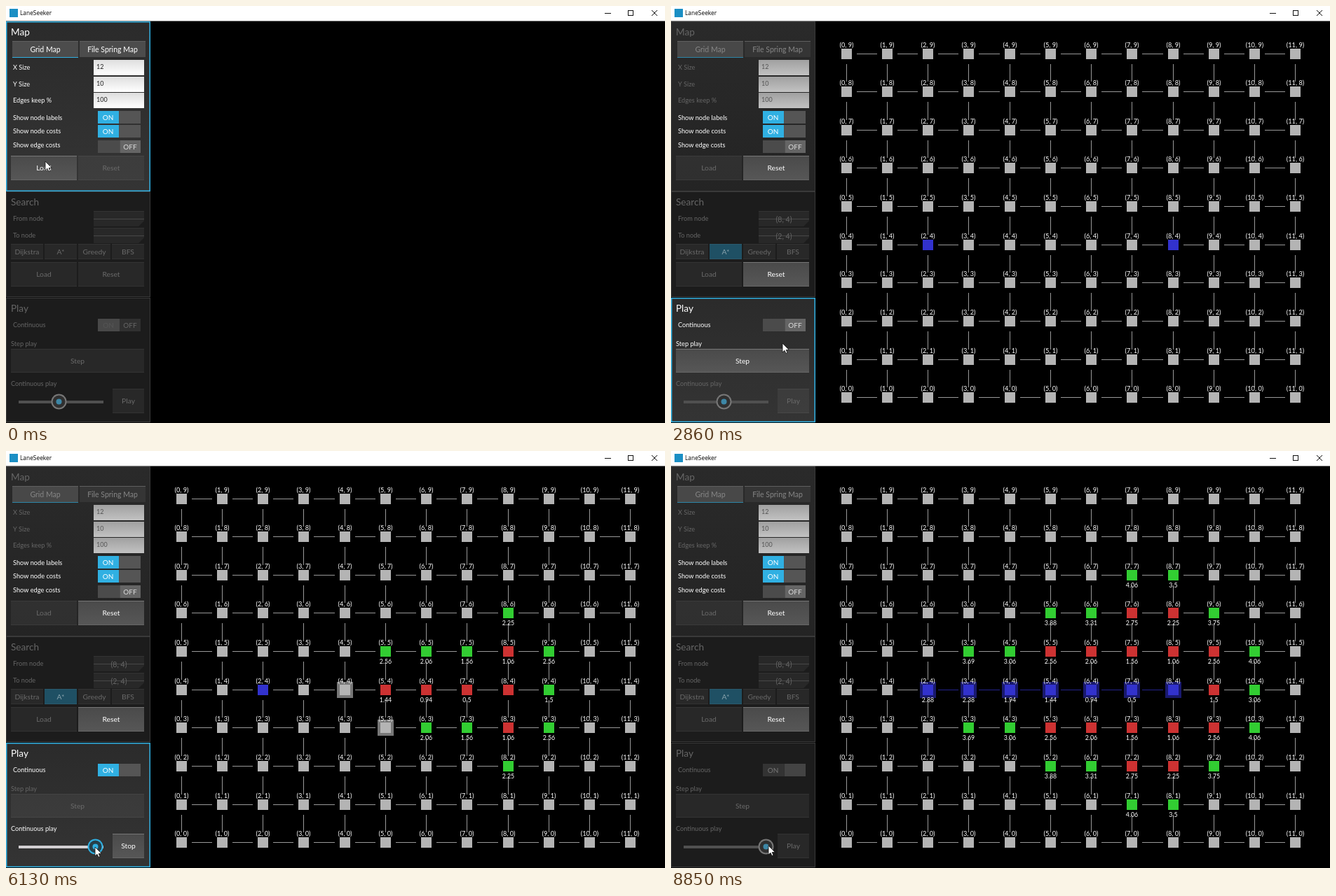
An HTML page with a canvas that plays this animation: 940 by 596 pixels, repeating every 9250 ms.

```html
<!DOCTYPE html>
<html lang="en">
<head>
<meta charset="utf-8">
<title>Grid search</title>
<style>
html, body { margin: 0; width: 100%; height: 100%; overflow: hidden; background: #000; }
canvas { display: block; }
</style>
</head>
<body>
<canvas id="stage" width="940" height="596"></canvas>
<script>
const c = document.getElementById('stage').getContext('2d');
const LOOP = 9250, BLUE = '#30b0e2', COLS = 12, ROWS = 10;
const FROM = [8, 4], TO = [2, 4];

// Moments of the clicks, and of the first search step
const LOADED = 320, CHOSEN = 1520, READY = 2450, CONTINUOUS = 3470, PLAY = 4240, DRAG = 4900, SEARCH = 4390;

// Time, x, y of the pointer tip
const pointerPath = [[790, 56, 222], [1100, 92, 285], [1360, 75, 353], [2080, 74, 352],
  [2350, 54, 384], [2520, 54, 384], [2855, 159, 482], [3160, 177, 457], [3550, 177, 457],
  [4080, 159, 569], [4320, 159, 569], [DRAG, 75, 566], [6300, 134, 566], [6500, 139, 564]];

function pointerAt(t) {
  const k = pointerPath.findIndex(p => p[0] > t);
  if (k <= 0) return pointerPath.at(k).slice(1);
  const p = pointerPath[k - 1], q = pointerPath[k];
  const u = (t - p[0]) / (q[0] - p[0]);
  return [1, 2].map(i => Math.round(p[i] + (q[i] - p[i]) * u));
}

// The search runs faster once the slider has been dragged
const stepsAt = t => t < SEARCH ? -1 : Math.floor(Math.max((t - SEARCH) / 78.6, 22 + (t - 6120) / 51));

// Steps walked plus straight distance left, in sixteenths; the map is 100 units wide and high
function cost([x, y]) {
  const left = (px, py) => Math.hypot((px - TO[0]) * 100 / COLS, (py - TO[1]) * 100 / ROWS);
  const walked = Math.abs(x - FROM[0]) + Math.abs(y - FROM[1]);
  return Math.round(16 * walked + left(x, y) - left(...FROM)) / 16;
}

const same = (a, b) => a[0] === b[0] && a[1] === b[1];
const has = (list, node) => list.some(p => same(p, node));

function search(steps) {
  const open = [FROM], closed = [];
  let halo = [], done = false;
  for (let i = 0; i <= steps && !done; i++) {
    if (halo.length) {
      const node = halo.shift();
      if (!has(open, node)) open.push(node);
      continue;
    }
    const best = open.reduce((a, b) => cost(b) < cost(a) ? b : a);
    const [x, y] = best;
    open.splice(open.indexOf(best), 1);
    closed.push(best);
    done = same(best, TO);
    if (!done) halo = [[x, y + 1], [x + 1, y], [x, y - 1], [x - 1, y]].filter(p => !has(closed, p));
  }
  return { open, closed, halo, done };
}

function box(x, y, w, h, fill) {
  c.fillStyle = fill;
  c.fillRect(x, y, w, h);
}

function shade(y, h, top, bottom) {
  const g = c.createLinearGradient(0, y, 0, y + h);
  g.addColorStop(0, top);
  g.addColorStop(1, bottom);
  return g;
}

function text(s, x, y, size, fill, align = 'left', font = 'Lato, "Open Sans", sans-serif') {
  c.font = `${size}px ${font}`;
  c.textAlign = align;
  c.textBaseline = 'middle';
  c.fillStyle = fill;
  c.fillText(s, x, y);
}

function line(color, ...p) {
  c.strokeStyle = color;
  c.lineWidth = 1;
  c.beginPath();
  for (let i = 0; i < p.length; i += 2) c.lineTo(p[i], p[i + 1]);
  c.stroke();
}

function disc(x, y, r, fill) {
  c.beginPath();
  c.arc(x, y, r, 0, 7);
  c.fillStyle = fill;
  c.fill();
}

const ink = on => on ? '#fff' : '#666';
const label = (s, x, y, on) => text(s, x, y, 9.2, ink(on));

function panel(title, y, h, active, base) {
  box(0, y, 206, h, active ? shade(y, h, '#2b2b2b', '#343434') : base);
  c.strokeStyle = active ? BLUE : '#3a3a3a';
  c.lineWidth = active ? 1.5 : 1;
  const inset = c.lineWidth / 2;
  c.strokeRect(inset, y + inset, 206 - 2 * inset, h - 2 * inset);
  text(title, 7, y + 16, 13.6, ink(active));
}

function button(s, x, y, w, h, on, lit) {
  const off = 'rgba(255,255,255,.05)';
  box(x, y, w, h, lit ? (on ? BLUE : '#1f5064') : on ? shade(y, h, '#4a4a4a', '#575757') : off);
  box(x, y, w, 1, on ? '#777' : off);
  box(x, y + h - 1, w, 1, on ? '#666' : off);
  text(s, x + w / 2, y + h / 2 + .5, 10.3, on ? '#fff' : lit ? '#8aa4ae' : '#6a6a6a', 'center');
}

function field(s, y, on) {
  box(125, y, 72, 22, on ? shade(y, 22, '#dedede', '#fff') : shade(y, 22, '#a0a0a0', '#c2c2c2'));
  text(s, 129, y + 10, 9, on ? '#222' : '#555');
}

function toggle(y, value, on) {
  const word = (s, x, fill) => text(s, x, y + 9.5, 10, fill, 'center', 'Lato, "Open Sans", sans-serif');
  box(131, y, 61, 18, on ? '#505050' : '#303030');
  if (value) {
    box(131, y, 30, 18, on ? BLUE : '#333');
    box(162, y, 30, 18, on ? '#555' : '#444');
    word('ON', 145.5, on ? '#fff' : '#777');
  } else {
    box(131, y, 31, 18, on ? '#4b4b4b' : '#484848');
    box(163, y, 29, 18, on ? '#656565' : '#303030');
    if (!on) word('ON', 146, '#555');
    word('OFF', 177, on ? '#ddd' : '#666');
  }
}

function dropdown(s, y, on) {
  c.fillStyle = on ? shade(y, 22, '#3b3b3b', '#4b4b4b') : '#282828';
  c.beginPath();
  c.moveTo(125, y);
  c.lineTo(197, y);
  c.lineTo(197, y + 14);
  c.lineTo(189, y + 22);
  c.lineTo(125, y + 22);
  c.fill();
  box(125, y, 72, 1, on ? '#666' : '#333');
  if (!on) box(125, y + 11, 72, 1, '#484848');
  text(s, 161, y + 13, 10.5, on ? '#fff' : '#666', 'center');
}

function titleBar() {
  box(0, 0, 940, 21.5, '#fff');
  box(5, 4, 12, 12, '#1b8fc4');
  text('LaneSeeker', 20, 10.5, 8.4, '#000', 'left', '"Open Sans", "Noto Sans", sans-serif');
  line('#111', 854, 10.5, 863, 10.5);
  c.strokeRect(887.5, 6.5, 7, 7);
  line('#111', 921, 6, 929, 14);
  line('#111', 929, 6, 921, 14);
}

function mapPanel(loaded) {
  panel('Map', 22, 243, !loaded, shade(22, 243, '#2a2a2a', '#242424'));
  ['Grid Map', 'File Spring Map'].forEach((name, i) => {
    const x = 9 + 96 * i;
    box(x, 50, 94, 23, loaded ? (i ? '#353535' : '#484848') : '#4c4c4c');
    box(x, 50, 94, 1, '#606060');
    text(name, x + 47, 63, 10.5, loaded ? '#868686' : '#fff', 'center');
  });
  box(9, 73, 94, 1, loaded ? '#2c86a8' : BLUE);
  [['X Size', COLS], ['Y Size', ROWS], ['Edges keep %', 100]].forEach(([name, value], i) => {
    label(name, 10, 88.5 + 23.5 * i, !loaded);
    field(value, Math.round(77 + 23.5 * i), !loaded);
  });
  ['node labels', 'node costs', 'edge costs'].forEach((name, i) => {
    label('Show ' + name, 10, 160 + 19.5 * i, true);
    toggle(150 + 21 * i - i % 2, i < 2, true);
  });
  button('Load', 7, 214, 94, 35, !loaded);
  button('Reset', 103, 214, 94, 35, loaded);
}

function searchPanel(loaded, chosen, ready) {
  const on = loaded && !ready;
  panel('Search', 265, 151, on, '#1c1c1c');
  label('From node', 10, 304.5, on);
  label('To node', 10, 328, on);
  dropdown(loaded ? `(${FROM.join(', ')})` : '', 293, on);
  dropdown(loaded ? `(${TO.join(', ')})` : '', 317, on);
  ['Dijkstra', 'A*', 'Greedy', 'BFS'].forEach((name, i) =>
    button(name, 7 + 48 * i, 340, 46, 22, on, i === 1 && chosen));
  button('Load', 7, 366, 94, 35, on && chosen);
  button('Reset', 103, 366, 94, 35, ready);
}

function playPanel(on, continuous, playing, knob) {
  const stepOn = on && !continuous, runOn = on && continuous;
  panel('Play', 417, 178, on, '#1c1c1c');
  label('Continuous', 10, 456.5, on);
  toggle(447, continuous, on);
  label('Step play', 7, 483, stepOn);
  button('Step', 7, 490, 190, 34, stepOn);
  label('Continuous play', 7, 540.5, runOn);
  button(playing ? 'Stop' : 'Play', 152, 547, 45, 35, runOn);
  box(18, 564, 121, 4, runOn ? '#d2cfd2' : '#505050');
  disc(knob + .5, 565.5, 11, runOn ? BLUE : '#777');
  disc(knob + .5, 565.5, 9, runOn ? '#263f4a' : '#303030');
  disc(knob + .5, 565.5, 4, runOn ? BLUE : '#3d87a6');
}

function grid(found) {
  const px = x => Math.floor(250.25 + 58.23 * x) + .5;
  const py = y => Math.floor(559.61 - 54.61 * y) + .5;
  const onPath = (x, y) => found.done && y === TO[1] && x >= TO[0] && x <= FROM[0];
  const eachNode = draw => {
    for (let x = 0; x < COLS; x++) for (let y = 0; y < ROWS; y++) draw(x, y, px(x), py(y));
  };
  eachNode((x, y, X, Y) => {
    const joined = onPath(x, y) && onPath(x + 1, y);
    if (x < COLS - 1) line(joined ? '#24248c' : '#999', X + 14.5, Y, px(x + 1) - 14.5, Y);
    if (y < ROWS - 1) line('#999', X, Y - 14.5, X, py(y + 1) + 14.5);
  });
  eachNode((x, y, X, Y) => {
    const node = [x, y], path = onPath(x, y);
    const opened = has(found.open, node), closed = has(found.closed, node);
    const end = same(node, FROM) || same(node, TO);
    const fill = path ? '#3232cd' : closed ? '#cd3232' : end ? '#3232cd' : opened ? '#32cd32' : '#b4b4b4';
    if (path || has(found.halo, node)) box(X - 11.5, Y - 11.5, 23, 23, path ? '#19196e' : '#777');
    box(X - 7.5, Y - 7.5, 15, 15, fill);
    text(`(${x}, ${y})`, X, Y - 12.5, 9.2, '#fff', 'center');
    if ((opened || closed) && cost(node)) text(+cost(node).toFixed(2), X, Y + 14.5, 8.8, '#fff', 'center');
  });
}

function pointer(x, y) {
  c.beginPath();
  [[0, 0], [0, 13], [3, 10.3], [5, 14.5], [7, 13.6], [5.2, 9.6], [9.3, 9.4]]
    .forEach(([dx, dy]) => c.lineTo(x + dx, y + dy));
  c.closePath();
  c.fillStyle = '#fff';
  c.fill();
  c.strokeStyle = '#111';
  c.lineWidth = .8;
  c.stroke();
}

function draw(t) {
  const [x, y] = pointerAt(t);
  const found = search(stepsAt(t));
  const running = t >= READY && !found.done;
  box(0, 0, 940, 596, '#000');
  if (t >= LOADED) grid(found);
  box(0, 21.5, 206, 575, '#0c0c0c');
  mapPanel(t >= LOADED);
  searchPanel(t >= LOADED, t >= CHOSEN, t >= READY);
  playPanel(running, t >= CONTINUOUS, running && t >= PLAY, t < DRAG ? 75 : Math.min(135, x));
  titleBar();
  pointer(x, y);
}

const start = performance.now();
(function tick() {
  draw((performance.now() - start) % LOOP);
  requestAnimationFrame(tick);
})();
</script>
</body>
</html>
```
